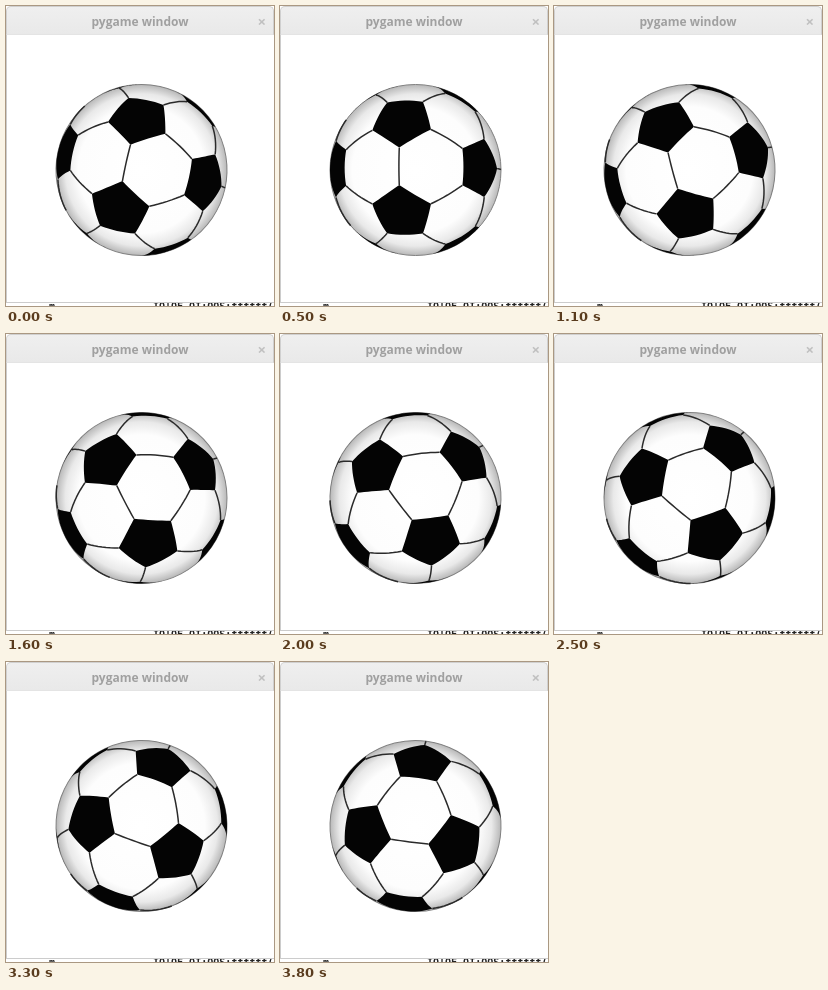
Recreate the animation shown at these times as an HTML page with a canvas. Size 268 px wide and 300 px high, loop 3.9 s.

```html
<!DOCTYPE html>
<html lang="en">
<head>
<meta charset="utf-8">
<title>pygame window</title>
<style>
  html, body { margin: 0; width: 268px; height: 300px; overflow: hidden; background: #fff; }
  body { position: relative; }
  #bar {
    position: absolute; inset: 0 0 auto 0; height: 29px; box-sizing: border-box;
    border: 1px solid #d0d0d0; border-bottom-color: #e4e4e4; border-radius: 5px 5px 0 0;
    background: linear-gradient(#efefef, #e9e9e9); color: #a0a0a0;
    font: bold 12px/29px "Open Sans", sans-serif; text-align: center;
  }
  #bar span { position: absolute; right: 7px; top: 0; color: #c0c0c0; font-size: 15px; }
  #frame { position: absolute; inset: 29px 0 4px; border-left: 1px solid #ccc; }
  #below {
    position: absolute; inset: 296px 0 0; overflow: hidden; border-top: 1px solid #ccc;
    color: #222; font: bold 10px/10px "DejaVu Sans Mono", monospace; white-space: pre;
  }
  #below i { position: absolute; top: -1px; font-style: normal; }
  canvas { position: absolute; left: 0; top: 0; }
</style>
</head>
<body>
<div id="frame"></div>
<div id="bar">pygame window<span>×</span></div>
<div id="below"><i style="left:43px">m</i><i style="left:147px">IO!OF OI:OOS:ffffff(O</i></div>
<canvas width="268" height="300"></canvas>
<script>
const ctx = document.querySelector('canvas').getContext('2d');
const CX = 135.5, CY = 164, R = 85.5;
const STEP = 100, STEPS = 39, START = 12.5, TURN = -2.5;
const RAD = Math.PI / 180, PHI = (1 + Math.sqrt(5)) / 2;
// Eye distance in ball radii, and the height of the visible rim
const EYE = 12, RIM = 1 / EYE;

const dot = (a, b) => a[0] * b[0] + a[1] * b[1] + a[2] * b[2];
const cross = (a, b) => [a[1] * b[2] - a[2] * b[1], a[2] * b[0] - a[0] * b[2], a[0] * b[1] - a[1] * b[0]];
const unit = a => a.map(c => c / Math.sqrt(dot(a, a)));
const mix = (a, b, k) => unit(a.map((c, i) => c + (b[i] - c) * k));

// Tilt of the ball towards the viewer
function pose([x, y, z]) {
  const b = -10.3 * RAD, t = 2.4 * RAD;
  const depth = z * Math.cos(b) - x * Math.sin(b);
  return unit([
    x * Math.cos(b) + z * Math.sin(b),
    y * Math.cos(t) - depth * Math.sin(t),
    depth * Math.cos(t) + y * Math.sin(t)
  ]);
}

// Icosahedron corners are the pentagon centres
const centres = [];
for (const s of [-1, 1]) for (const t of [-PHI, PHI])
  centres.push(pose([0, s, t]), pose([s, t, 0]), pose([t, 0, s]));

const arc = (a, b) => Array.from({ length: 9 }, (_, i) => mix(a, b, i / 8));
const pentagons = [], seams = [];
centres.forEach((p, i) => {
  const near = centres.filter(q => q !== p && dot(p, q) > 0.4);
  const v = cross(p, near[0]), u = cross(v, p);
  const angle = q => Math.atan2(dot(q, v), dot(q, u));
  near.sort((a, b) => angle(a) - angle(b));
  const corners = near.map(q => mix(p, q, 1 / 3));
  pentagons.push(corners.flatMap((c, k) => arc(c, corners[(k + 1) % 5])));
  for (const q of near)
    if (centres.indexOf(q) > i) seams.push(arc(mix(p, q, 1 / 3), mix(p, q, 2 / 3)));
});

const visible = p => p[2] >= RIM;

// Perspective view; hidden points slide onto the outline
function project(p) {
  const scale = visible(p)
    ? R * Math.sqrt(EYE * EYE - 1) / (EYE - p[2])
    : R / Math.hypot(p[0], p[1]);
  return [p[0] * scale, p[1] * scale];
}

function trace(points) {
  ctx.beginPath();
  for (const p of points) ctx.lineTo(...project(p));
}

const shade = ctx.createRadialGradient(0, 0, 0, 0, 0, R);
shade.addColorStop(0, '#fff');
shade.addColorStop(0.74, '#fdfdfd');
shade.addColorStop(0.89, '#e9e9e9');
shade.addColorStop(1, '#b8b8b8');

function drawBall(degrees) {
  ctx.clearRect(0, 0, 268, 300);
  ctx.save();
  ctx.translate(CX, CY);
  ctx.rotate(degrees * RAD);
  ctx.lineJoin = 'round';

  ctx.beginPath();
  ctx.arc(0, 0, R, 0, 2 * Math.PI);
  ctx.fillStyle = shade;
  ctx.fill();
  ctx.lineWidth = 1;
  ctx.strokeStyle = '#808080';
  ctx.stroke();

  ctx.lineWidth = 1.5;
  ctx.strokeStyle = '#2a2a2a';
  for (const seam of seams) {
    trace(seam.filter(visible));
    ctx.stroke();
  }
  ctx.fillStyle = '#040404';
  for (const pentagon of pentagons) {
    if (!pentagon.some(visible)) continue;
    trace(pentagon);
    ctx.closePath();
    ctx.fill();
  }
  ctx.restore();
}

function tick() {
  const step = Math.floor(performance.now() / STEP) % STEPS;
  drawBall(START + TURN * step);
  requestAnimationFrame(tick);
}
tick();
</script>
</body>
</html>
```
